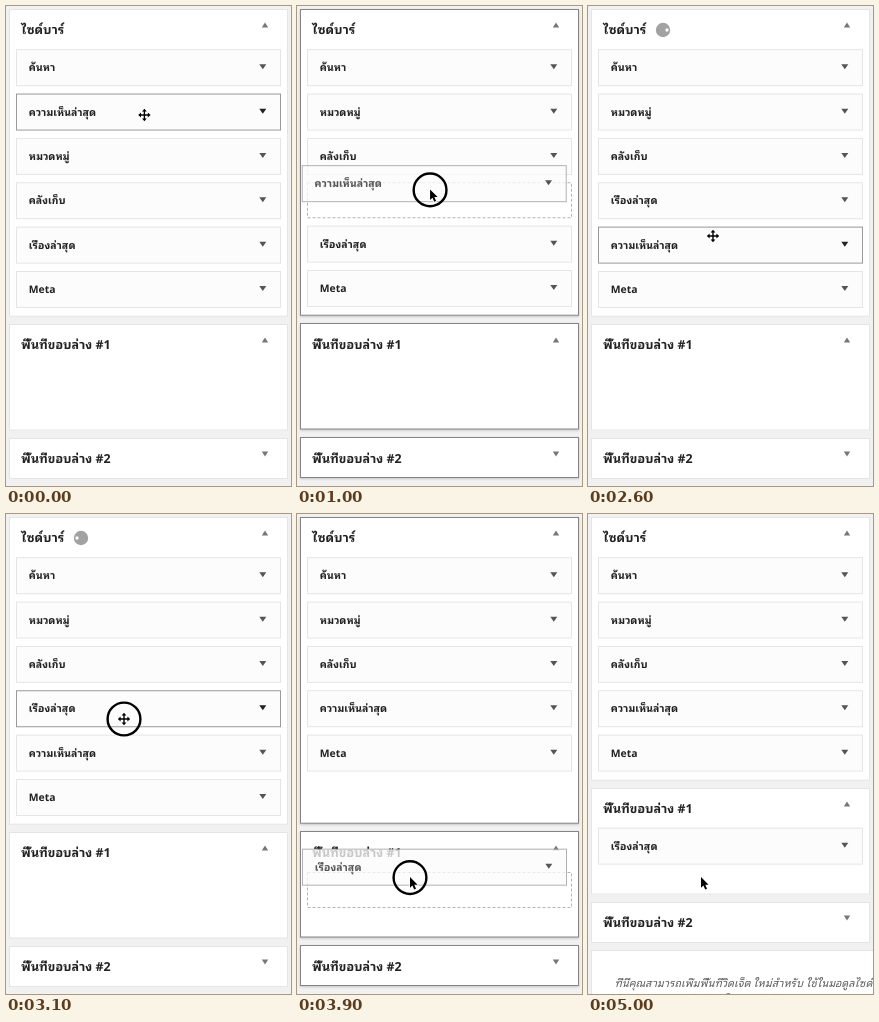
Recreate the animation shown at these times as an HTML page. Size 285x480 px, loop 5100 ms.

```html
<!DOCTYPE html>
<html lang="th">
<head>
<meta charset="utf-8">
<title>Widget sorting</title>
<style>
  html, body { margin: 0; width: 100%; height: 100%; overflow: hidden; background: #f1f1f1; }
  svg { display: block; width: 100vw; height: 100vh; }
  text {
    font: 700 10.4px "Open Sans", "Noto Sans Thai Looped", "Noto Looped Thai", "Noto Sans Thai", "Noto Sans", sans-serif;
    text-rendering: geometricPrecision;
    fill: #222;
  }
  .title { font-size: 12.4px; }
  .note { font-size: 10.8px; font-weight: 500; font-style: italic; fill: #5c5c5c; }
  .panel { fill: #fff; stroke: #e5e5e5; }
  .dragging .panel { stroke: #858585; filter: drop-shadow(0 1px 1px rgba(0, 0, 0, .18)); }
  .box { fill: #fcfcfc; stroke: #e5e5e5; }
  .arrow { fill: #555; }
  .panel ~ .arrow { fill: #777; }
  .hover .box { stroke: #999; }
  .hover .arrow { fill: #222; }
  .held { opacity: .76; }
  .slot { fill: none; stroke: #b4b4b4; stroke-dasharray: 3 2; }
</style>
</head>
<body>
<svg id="stage" viewBox="0 0 285 480"></svg>
<script>
const LOOP = 5100, STEP = 100, TOP = 43.7, ROW = 44.35;
const stage = document.getElementById('stage');

function add(parent, tag, attrs = {}, text = '') {
  const el = document.createElementNS('http://www.w3.org/2000/svg', tag);
  for (const key in attrs) el.setAttribute(key, attrs[key]);
  el.textContent = text;
  parent.appendChild(el);
  return el;
}
const move = (el, x, y) => el.setAttribute('transform', `translate(${x} ${y})`);
const show = (el, on) => el.setAttribute('visibility', on ? 'visible' : 'hidden');
const between = (t, a, b) => t >= a && t < b;

function addPanel(parent, top, height, title, open) {
  const rect = add(parent, 'rect', { class: 'panel', x: 3.5, y: top, width: 278, height });
  add(parent, 'text', { class: 'title', x: 15, y: top + 24.7 }, title);
  const d = open ? 'm-3.2 2.5h6.4l-3.2-5z' : 'm-3.2-2.5h6.4l-3.2 5z';
  add(parent, 'path', { class: 'arrow', d: `M259 ${top + 15.6}${d}` });
  return { rect, top, height };
}

function addItem(label) {
  const g = add(stage, 'g');
  add(g, 'rect', { class: 'box', width: 264, height: 36 });
  add(g, 'text', { x: 12.3, y: 21.6 }, label);
  add(g, 'path', { class: 'arrow', d: 'M242.8 14.6h7l-3.5 5z' });
  return g;
}

function addSpinner(x, y) {
  const g = add(stage, 'g');
  move(g, x, y);
  add(g, 'circle', { r: 7.2, fill: '#a2a2a2' });
  const dot = add(g, 'circle', { cx: 4, r: 1.7, fill: '#fff' });
  return { g, dot };
}

// Panels
const sidebarGroup = add(stage, 'g');
const sidebar = addPanel(sidebarGroup, 3.5, 306.7, 'ไซด์บาร์', true);
const lower = add(stage, 'g');
const areaOne = addPanel(add(lower, 'g'), 318.5, 105.5, 'พื้นที่ขอบล่าง #1', true);
const areaTwo = addPanel(add(lower, 'g'), 432.5, 40, 'พื้นที่ขอบล่าง #2', false);
add(lower, 'rect', { x: 3.5, y: 480.5, width: 320, height: 90, fill: '#fff', stroke: '#e5e5e5' });
add(lower, 'text', { class: 'note', x: 26.4, y: 516.6 }, 'ที่นี่คุณสามารถเพิ่มพื้นที่วิดเจ็ต ใหม่สำหรับ ใช้ในมอดูลไซด์บาร์');
add(lower, 'text', { class: 'note', x: 97, y: 533 }, 'พื้นที่วิดเจ็ตของธีมนี้');

// Widgets; the two that get dragged are painted last
const slot = add(stage, 'rect', { class: 'slot', x: 10.5, width: 264, height: 35 });
const labels = {
  search: 'ค้นหา', category: 'หมวดหมู่', archive: 'คลังเก็บ', meta: 'Meta',
  comments: 'ความเห็นล่าสุด', recent: 'เรื่องล่าสุด'
};
const items = {};
for (const id in labels) items[id] = addItem(labels[id]);

const spinners = [
  { ...addSpinner(75, 24), from: 1700, to: 3200 },
  { ...addSpinner(121, 294.5), from: 4300, to: 4900 }
];

// Pointer
const pointer = add(stage, 'g');
const ring = add(pointer, 'circle', { r: 16.4, fill: 'none', stroke: '#000', 'stroke-width': 2.4 });
const outline = { stroke: '#fff', 'stroke-width': 1.4, 'paint-order': 'stroke' };
const arrow = add(pointer, 'path', { ...outline, d: 'M0-.5v10.6l2.4-2.2 1.8 4 1.8-.8-1.7-3.9h3.3z' });
const cross = add(pointer, 'path', {
  ...outline,
  d: 'M0-6.2l2.4 2.8H.7V-.7h2.7v-1.7l2.8 2.4-2.8 2.4V.7H.7v2.7h1.7L0 6.2l-2.4-2.8h1.7V.7h-2.7v1.7l-2.8-2.4 2.8-2.4v1.7h2.7v-2.7h-1.7z'
});

// Pointer path: time, x, y
const path = [
  [0, 138.4, 109], [600, 138.4, 109], [700, 133.7, 151.4], [1500, 132, 238], [1900, 132, 238],
  [2600, 125, 230], [3000, 118, 205], [3300, 118, 205], [3400, 117, 250],
  [3500, 115, 301], [3800, 113, 363], [3900, 113, 363.6], [LOOP, 113, 363.6]
];

const drags = [
  { id: 'comments', press: 400, start: 800, release: 1500, drop: 1700, grab: [138.4, 109], home: TOP + ROW },
  { id: 'recent', press: 3100, start: 3500, release: 4100, drop: 4300, grab: [118, 205], home: TOP + 3 * ROW }
];

function pointerAt(t) {
  const i = Math.max(1, path.findIndex(p => p[0] >= t));
  const [a, b] = [path[i - 1], path[i]];
  const k = (t - a[0]) / (b[0] - a[0]);
  return [a[1] + (b[1] - a[1]) * k, a[2] + (b[2] - a[2]) * k];
}

const rowY = i => TOP + i * ROW;

function orderAt(t) {
  const first = ['search', 'comments', 'category', 'archive', 'recent', 'meta'];
  const second = ['search', 'category', 'archive', 'recent', 'comments', 'meta'];
  if (t < 1700) return first;
  return t < 4300 ? second : second.filter(id => id !== 'recent');
}

function render(t) {
  const [px, py] = pointerAt(t);
  const drag = drags.find(d => between(t, d.press, d.drop));
  const active = drag && t >= drag.start;
  const pressed = drag && t < drag.release;
  const done = t >= 4300;
  const place = {};

  let order = orderAt(t), row = -1, inArea = false;
  if (active) {
    // The dragged widget trails the pointer slightly
    const [x, y] = pointerAt(t - 30);
    const top = drag.home + y - drag.grab[1];
    place[drag.id] = [10.5 + x - drag.grab[0], top];
    order = order.filter(id => id !== drag.id);
    inArea = py > 324;
    if (!inArea) {
      row = Math.max(0, Math.min(5, Math.round((top - TOP) / ROW)));
      order.splice(row, 0, null);
    }
    slot.setAttribute('y', inArea ? 358.5 : rowY(row));
  }
  order.forEach((id, i) => {
    if (id) place[id] = [10.5, rowY(i) - (row >= 0 && i > row ? 1 : 0)];
  });
  if (done) place.recent = [10.5, 314.1];

  let over = null;
  for (const id in place) {
    const [x, y] = place[id];
    move(items[id], x, y);
    if (py >= y && py <= y + 36 && (!active || id === drag.id)) over = id;
  }
  if (drag && !active) over = drag.id;
  for (const id in items) {
    items[id].classList.toggle('hover', id === over);
    items[id].classList.toggle('held', Boolean(active && id === drag.id));
  }

  const nudge = active ? 1 : 0;
  stage.classList.toggle('dragging', Boolean(active));
  show(slot, active);
  sidebar.rect.setAttribute('height', sidebar.height - nudge - (done ? 44 : 0));
  areaOne.rect.setAttribute('y', areaOne.top - nudge);
  areaTwo.rect.setAttribute('y', areaTwo.top - nudge);
  move(lower, 0, done ? -44 : 0);

  for (const s of spinners) {
    show(s.g, between(t, s.from, s.to));
    s.dot.setAttribute('transform', `rotate(${(t - 2600) * .36})`);
  }

  const crossed = over && !(pressed && (active || Math.hypot(px - drag.grab[0], py - drag.grab[1]) > 2));
  move(pointer, px, py);
  show(ring, pressed);
  show(cross, crossed);
  show(arrow, !crossed);
}

const begin = performance.now();
function tick() {
  const t = (performance.now() - begin) % LOOP;
  render(Math.floor(t / STEP) * STEP);
  requestAnimationFrame(tick);
}
tick();
</script>
</body>
</html>
```
